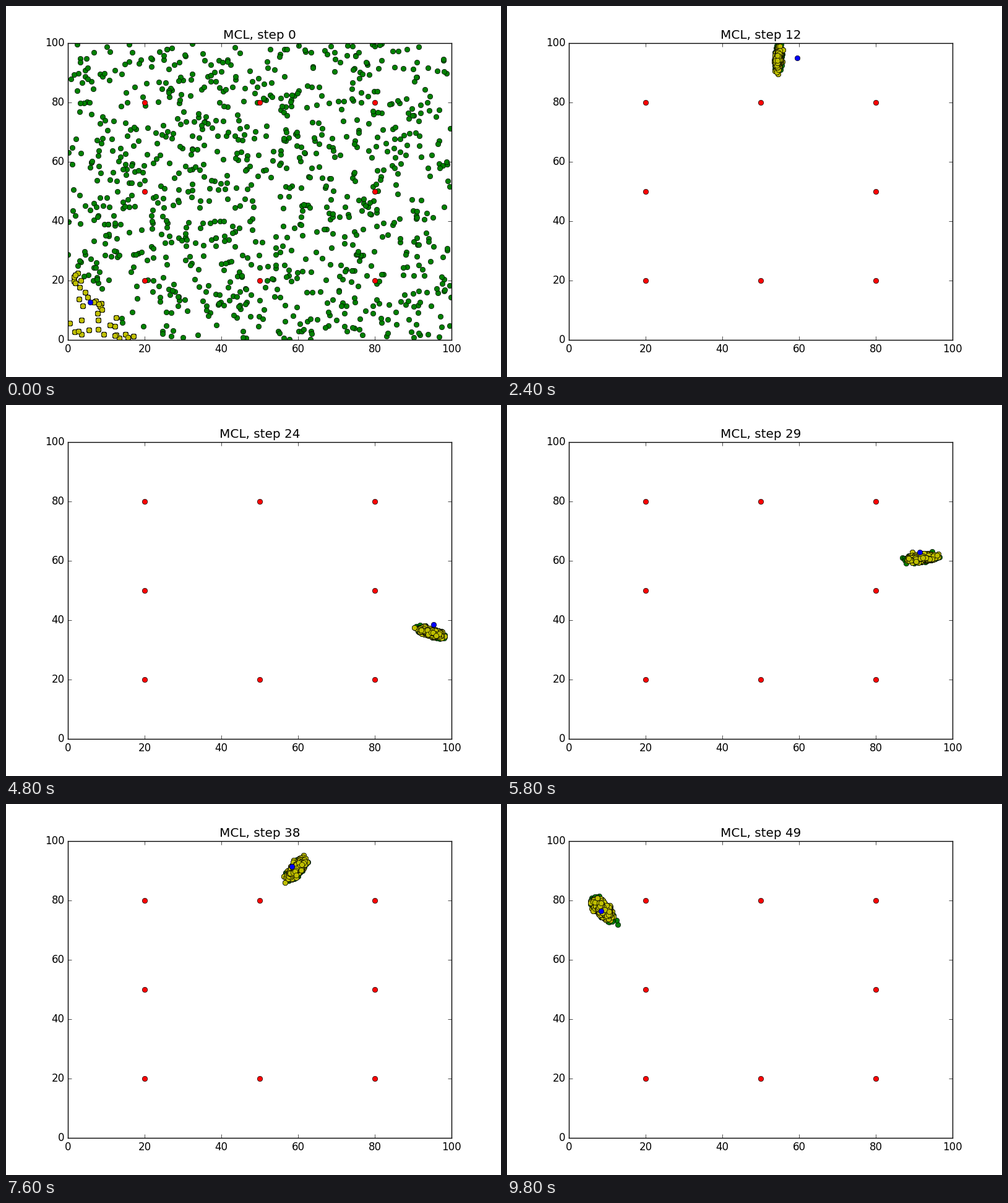
Recreate the animation shown at these times as a matplotlib script. Size 800 by 600 pixels, loop 10 s.

```python
import numpy as np
import matplotlib.pyplot as plt
from matplotlib.animation import FuncAnimation

plt.style.use("classic")
plt.rcParams["font.family"] = "DejaVu Sans"

SIZE = 100
STEPS = 50
COUNT = 1000
TURN, FORWARD = 0.1, 5.0
START, HEADING = np.array([5.8, 12.7]), -0.8687
CROSSING = 14  # step at which the edge of the world thins out the cloud


def rotation(a):
    return np.array([[np.cos(a), np.sin(a)], [-np.sin(a), np.cos(a)]])


def robot(step):
    """Position on the arc, before wrapping round the world."""
    a = HEADING + TURN * np.arange(step)
    return START + FORWARD * np.array([np.cos(a).sum(), np.sin(a).sum()])


def first_particles():
    """Uniform particles, and those in the robot's corner that survive."""
    rng = np.random.default_rng(11)
    p = rng.uniform(0, SIZE, (COUNT, 2))
    corner = p[p[:, 0] / 18 + p[:, 1] / 27 < 1]
    return p, corner


def strays(step, rng):
    """Side groups on their own headings; a third survives each step."""
    ends = first_particles()[1]
    a = np.random.default_rng(5).uniform(-np.pi, np.pi, len(ends))
    ends = ends + FORWARD * step * np.column_stack([np.cos(a), np.sin(a)])
    groups = [ends[:21 // 3 ** k].repeat(12, axis=0) for k in (step - 1, step)]
    return [g + rng.normal(0, 0.15 * step, g.shape) for g in groups]


def cloud(step, rng):
    """Particles tracking the robot, and their resampling."""
    keys = (4, 12, 24, 33, 49)
    offset = (np.interp(step, keys, (-5.7, -4.9, -0.6, 1.3, 0.4)),
              np.interp(step, keys, (-0.8, -0.2, -2.7, -1.4, 0.7)))
    age = step - CROSSING if step > CROSSING else step
    spread = 1.65 * (1 - np.exp(-age / 4)), 0.105 * np.sqrt(step)
    tilt = 0.3 + 0.102 * step

    pos = robot(step)
    z = rng.normal(size=(COUNT, 2))
    moved = ((z * spread) @ rotation(tilt) + pos + offset) % SIZE

    # Sensing ignores the wrap, so particles across an edge get no weight.
    near = (np.abs(moved - pos % SIZE) < SIZE / 2).all(axis=1)
    w = np.exp(-(z ** 2).sum(axis=1) / 9) * near + 1e-12
    return moved, rng.choice(moved, COUNT, p=w / w.sum())


def particles(step):
    rng = np.random.default_rng(100 + step)
    if step == 0:
        moved, corner = first_particles()
        return moved, rng.choice(corner, COUNT)
    return [np.vstack([main, side % SIZE])
            for main, side in zip(cloud(step, rng), strays(step, rng))]


fig, ax = plt.subplots(figsize=(8, 6), dpi=100, facecolor="white")
ax.set_xlim(0, SIZE)
ax.set_ylim(0, SIZE)
title = ax.set_title("")
green, = ax.plot([], [], "go")
yellow, = ax.plot([], [], "yo")
marks = [(x, y) for x in (20, 50, 80) for y in (20, 50, 80) if (x, y) != (50, 50)]
ax.plot(*zip(*marks), "ro")
blue, = ax.plot([], [], "bo")


def draw(step):
    moved, picked = particles(step)
    green.set_data(*moved.T)
    yellow.set_data(*picked.T)
    x, y = robot(step) % SIZE
    blue.set_data([x], [y])
    title.set_text(f"MCL, step {step}")
    return green, yellow, blue, title


anim = FuncAnimation(fig, draw, frames=STEPS, interval=200, repeat=True,
                     repeat_delay=0, blit=False)
plt.show()
```
